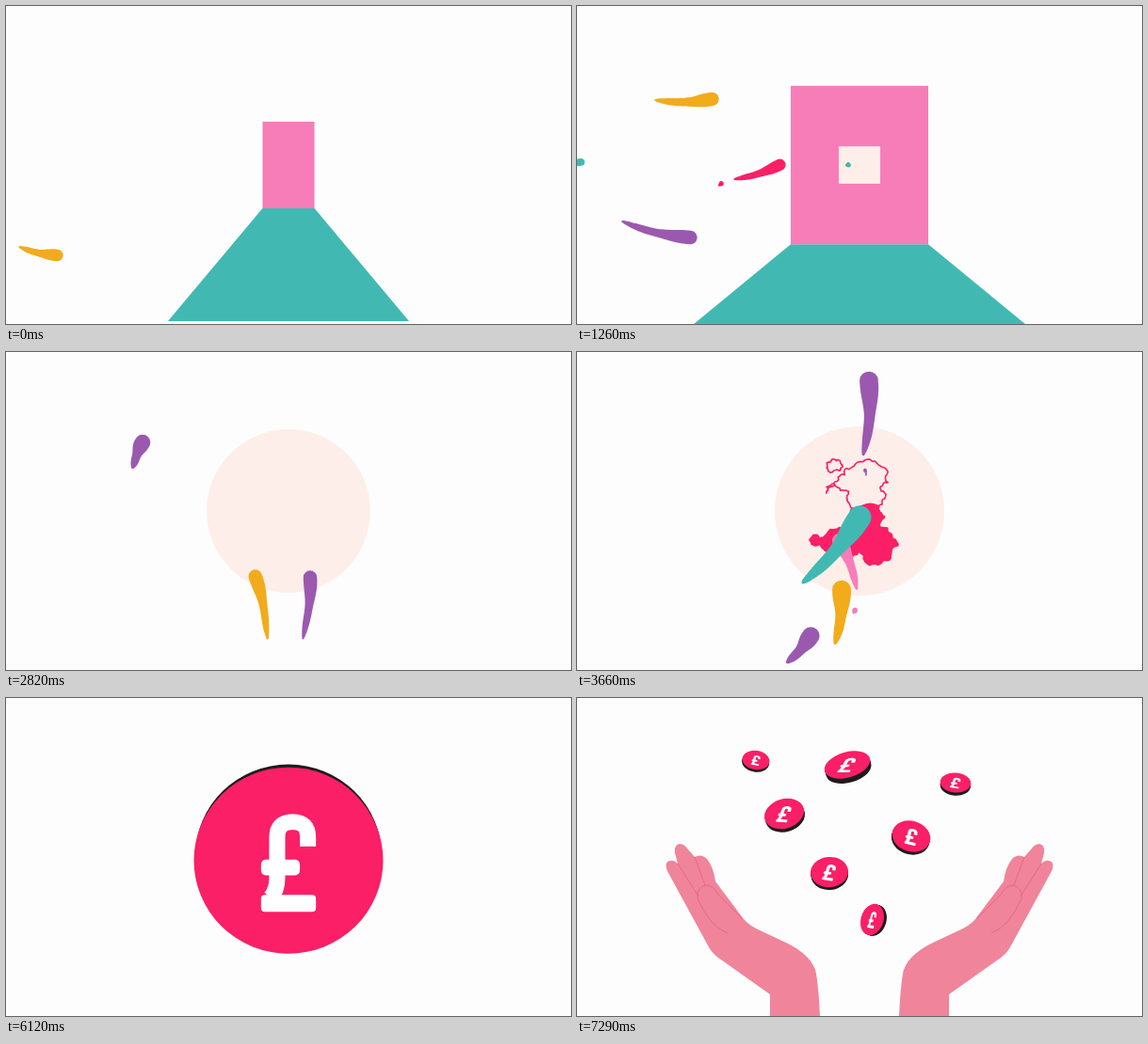
Recreate the animation shown at these times as an HTML page with a canvas. Size 600x338 px, loop 7320 ms.

```html
<!DOCTYPE html>
<html lang="en">
<head>
<meta charset="utf-8">
<title>Corridor, map and coins</title>
<style>
html, body { margin: 0; width: 100%; height: 100%; overflow: hidden; background: #fdfdfd; }
canvas { display: block; width: 100vw; height: 100vh; }
</style>
</head>
<body>
<canvas id="stage" width="600" height="338"></canvas>
<script>
const c = document.getElementById('stage').getContext('2d');
const LOOP = 7320, CX = 300, CY = 169, RUSH = 2220;
const PAPER = '#fdfdfd', PINK = '#f77db9', TEAL = '#41b9b2', GOLD = '#f2ab1b', RED = '#fa1f66',
  PURPLE = '#9a59ae', CREAM = '#feeee9', DARK = '#1f1c1e', SKIN = '#f0849a', CREASE = '#e9668c';

const clamp = x => Math.max(0, Math.min(1, x));
const mix = (a, b, k) => a + (b - a) * k;
const span = (t, a, b) => clamp((t - a) / (b - a));
const easeOut = k => 1 - (1 - k) ** 3;
const backOut = k => 1 + 2.2 * (k - 1) ** 3 + 1.2 * (k - 1) ** 2;

let seed = 11;
const random = () => (seed = seed * 16807 % 2147483647) / 2147483647;

// ---- Corridor: steady approach, then a rush through the window

function room(t) {
  const rush = Math.max(0, (t - RUSH) / 90) ** 1.6;
  const w = 27.5 + .0361 * t + 70 * rush;
  const h = 46 + .0303 * t + 24 * rush;
  const floor = 128 + .038 * t + 12 * rush;
  const hole = Math.max(0, 22 + .026 * (t - 1260) + 43 * rush);
  const bottom = 335 + 3 * span(t, 0, 700);
  if (CY + h < 338) {
    c.fillStyle = TEAL;
    c.beginPath();
    c.moveTo(CX - w, CY + h);
    c.lineTo(CX + w, CY + h);
    c.lineTo(CX + floor, bottom);
    c.lineTo(CX - floor, bottom);
    c.fill();
  }
  c.fillStyle = PINK;
  c.fillRect(CX - w, CY - h, 2 * w, 2 * h);
  c.fillStyle = t < 2310 ? CREAM : PAPER;
  c.fillRect(CX - hole, CY - hole * .9, 2 * hole, 1.8 * hole);
}

const discRadius = t => 90 + .0037 * (t - 3660);

function disc(t) {
  const r = discRadius(t), k = span(t, 2310, 2520);
  const w = mix(92, r, k), h = mix(82, r, k);
  c.fillStyle = CREAM;
  c.beginPath();
  c.roundRect(CX - w, CY - h, 2 * w, 2 * h, mix(14, r, k));
  c.fill();
}

// ---- Paint strokes

// Each flock passes its listed pose at `time`, then curves into `goal`.
// A stroke is colour, radius, tail point, head point.
const HOME = [300, 167], SKY = [316, -140];
const FLOCKS = [
  { time: 0, speed: .4, goal: HOME, strokes: [[GOLD, 6, 14, 256, 54, 265]] },
  { time: 1260, speed: .4, goal: HOME, strokes: [
    [GOLD, 7, 83, 100, 143, 99],
    [RED, 6, 167, 184, 215, 169],
    [RED, 2.4, 150, 191, 153, 189],
    [PURPLE, 7, 48, 229, 120, 246],
    [TEAL, 3.6, -22, 165, 4, 166],
    [TEAL, 2.4, 285, 169, 288, 169]] },
  { time: 2310, speed: .4, goal: HOME, strokes: [
    [TEAL, 3.6, 267, 164, 287, 162],
    [RED, 4.4, 144, 164, 186, 160],
    [PURPLE, 4.6, 218, 129, 277, 160],
    [GOLD, 5.5, 191, 234, 275, 178]] },
  { time: 2310, speed: .5, goal: SKY, strokes: [[PURPLE, 8, 62, 365, 67, 336]] },
  { time: 3660, speed: .4, goal: SKY, strokes: [
    [PURPLE, 9.5, 304, 109, 310, 31],
    [PURPLE, 1.8, 307, 132, 306, 126],
    [PINK, 7.5, 297, 252, 279, 201],
    [TEAL, 11.8, 240, 245, 300, 176],
    [GOLD, 9.5, 274, 310, 281, 253],
    [PINK, 2.7, 293, 278, 295, 275],
    [PURPLE, 9, 223, 330, 248, 302]] }
];

// Fillers between the main flocks
const someColor = () => [GOLD, TEAL, PURPLE, RED][Math.floor(random() * 4)];
for (const time of [600, 1700, 2850]) {
  const rising = time > RUSH;
  const strokes = Array.from({ length: 2 }, () => {
    const x = rising ? 230 + 120 * random() : 60 + 40 * random();
    const y = rising ? 290 : 110 + 120 * random();
    const drift = 40 * (random() - .5);
    return [someColor(), 7, x, y, x + (rising ? drift : 60), y + (rising ? -65 : drift)];
  });
  FLOCKS.push({ time, speed: rising ? .5 : .4, goal: rising ? SKY : HOME, strokes });
}

function drawStroke([color, radius, tx, ty, hx, hy], { time, speed, goal: [ex, ey] }, t) {
  const dx = hx - tx, dy = hy - ty, len = Math.hypot(dx, dy);
  const rest = Math.hypot(ex - hx, ey - hy) / len;
  const k = (t - time) * speed / len;
  const size = radius * clamp(1 + rest - k);
  if (!size) return;
  const qx = hx + dx * rest / 2, qy = hy + dy * rest / 2;
  c.fillStyle = color;
  c.beginPath();
  for (let i = 0; i <= 60; i++) {
    const u = i / 60, s = k + u;
    let x = tx + dx * s, y = ty + dy * s;
    if (s > 1) {
      const b = Math.min((s - 1) / rest, 1), a = 1 - b;
      x = a * a * hx + 2 * a * b * qx + b * b * ex;
      y = a * a * hy + 2 * a * b * qy + b * b * ey;
    }
    const sway = .045 * Math.sin(Math.PI * s);
    const r = size * (.16 + .84 * u ** .7) * (1 + .1 * Math.sin(u * 9));
    x -= dy * sway;
    y += dx * sway;
    c.moveTo(x + r, y);
    c.arc(x, y, r, 0, 7);
  }
  c.fill();
}

// ---- Map: a coarse outline roughened into a coast

function rough(points, amount, depth) {
  if (!depth) return points;
  const finer = points.flatMap(([x, y], i) => {
    const [nx, ny] = points[(i + 1) % points.length];
    const k = amount * (random() * 2 - 1);
    return [[x, y], [(x + nx) / 2 - (ny - y) * k, (y + ny) / 2 + (nx - x) * k]];
  });
  return rough(finer, amount, depth - 1);
}

const COAST = '285,121 306,112 326,120 332,137 323,143 326,156 321,166 328,175 323,188 336,195 343,208 335,222 318,228 300,215 288,222 283,214 262,214 246,206 248,196 275,189 287,176 286,157 288,147 272,139 263,149 263,142 276,131'
  .split(' ').map(p => p.split(',').map(Number));
const ISLAND = Array.from({ length: 7 }, (_, i) => [272 + 9.5 * Math.cos(i * .9), 118 + 7.5 * Math.sin(i * .9)]);
const MAP = new Path2D([COAST, ISLAND].map(p => 'M' + rough(p, .28, 3).join('L') + 'Z').join(''));

function land(t) {
  const level = mix(232, 100, span(t, 3500, 3806)), zoom = discRadius(t) / 95;
  c.save();
  c.translate(CX, CY);
  c.scale(zoom, zoom);
  c.translate(-CX, -CY);
  c.strokeStyle = c.fillStyle = RED;
  c.lineWidth = mix(1.7, .4, span(t, 3750, 4100));
  c.lineJoin = 'round';
  c.setLineDash([1000 * span(t, 2850, 3500), 1100]);
  c.stroke(MAP);
  c.beginPath();
  c.moveTo(200, 300);
  for (let x = 200; x <= 400; x += 4) c.lineTo(x, level + 2.5 * Math.sin(x / 6 + t / 90));
  c.lineTo(400, 300);
  c.clip();
  c.fill(MAP);
  c.restore();
}

// ---- Coins

const HOOK = new Path2D('M320.5 158V148Q320.5 131.5 304.5 131.5Q288 131.5 288 148V192Q288 205 281 213');
const BARS = new Path2D();
BARS.roundRect(271, 172, 41, 17, 5);
BARS.roundRect(271, 210, 58, 18, 4);

function pound(scale) {
  c.save();
  c.scale(scale, scale);
  c.translate(-300, -173);
  c.strokeStyle = c.fillStyle = '#fff';
  c.lineWidth = 17;
  c.stroke(HOOK);
  c.fill(BARS);
  c.restore();
}

function ellipse(y, rx, ry, color) {
  c.fillStyle = color;
  c.beginPath();
  c.ellipse(0, y, rx, ry, 0, 0, 7);
  c.fill();
}

// `tilt` turns the face away from the viewer and reveals the dark edge
function coin(x, y, r, tilt, turn = 0, lean = 0) {
  const face = Math.cos(tilt), flat = Math.max(.05, Math.abs(face));
  const edge = .27 * r * Math.sin(tilt) * (face < 0 ? -1 : 1);
  c.save();
  c.translate(x, y);
  c.rotate(turn);
  for (let i = 4; i > 0; i--) ellipse(edge * i / 4, r * .985, r * flat * .985, DARK);
  ellipse(0, r, r * flat, RED);
  c.scale(r / 100, r * flat / 100);
  c.rotate(lean - turn);
  pound(1);
  c.restore();
}

function bigCoin(t) {
  if (t >= 6060) {
    const tilt = -2 * Math.PI * span(t, 6060, 6700) ** 1.53;
    coin(CX, CY + 3.7 + 290 * span(t, 6430, 6760) ** 2, 100.5, tilt);
    return;
  }
  const r = 101 * easeOut(span(t, 5300, 5620));
  c.save();
  c.translate(CX, CY + 2);
  ellipse(0, r, r, RED);
  pound(backOut(span(t, 5560, 5820)));
  c.restore();
}

// ---- Hands throwing coins

// x, y, radius, tilt, turn
const COINS = [
  [190, 66, 14.5, .8, .15],
  [287, 71, 25, 1, -.28],
  [402, 90, 16.3, .87, .08],
  [220, 123, 21.5, .76, -.3],
  [355, 147, 20.7, .67, .3],
  [268, 185, 20, .64, -.08],
  [313.5, 235.5, 17, .79, -1.27]
];
const HAND = new Path2D('M205 340V315L150 276Q143 271 139 263L96 184Q92 174 99 173Q103 172 107 176L104 165Q103 156 109 155Q114 155 118 161L125 169Q132 165 138 171Q145 180 147 195L174 231Q179 239 190 245L224 261Q251 275 254 293Q257 312 258 340Z');
const CREASES = new Path2D('M107 176L129 211M125 169L136 199M160 250Q140 242 128 213Q127 201 137 199Q145 199 150 209L176 235');

function giving(t) {
  COINS.forEach(([x, y, r, tilt, turn], i) => {
    const k = span(t, 6790 + i * 12, 7290), left = (1 - k) ** 2;
    if (k) coin(mix(x, 300, left), mix(y, 365, left), r, tilt + left * 7, turn + left * 2, .2);
  });
  const q = 1 - easeOut(span(t, 6700, 7200));
  for (const side of [1, -1]) {
    c.save();
    c.translate(CX, 0);
    c.scale(side, 1);
    c.translate(231 - CX, 338 + 210 * q);
    c.rotate(-.75 * q);
    c.translate(-231, -338);
    c.fillStyle = SKIN;
    c.fill(HAND);
    c.strokeStyle = CREASE;
    c.lineWidth = 1;
    c.stroke(CREASES);
    c.restore();
  }
}

function draw(t) {
  c.fillStyle = PAPER;
  c.fillRect(0, 0, 600, 338);
  if (t < 2700) room(t);
  if (t >= 2310 && t < 6060) disc(t);
  if (t >= 2850 && t < 5700) land(t);
  if (t < 5300) for (const flock of FLOCKS) flock.strokes.forEach(s => drawStroke(s, flock, t));
  if (t >= 5300 && t < 6790) bigCoin(t);
  if (t >= 6700) giving(t);
}

const start = performance.now();
function tick() {
  draw((performance.now() - start) % LOOP);
  requestAnimationFrame(tick);
}
tick();
</script>
</body>
</html>
```
